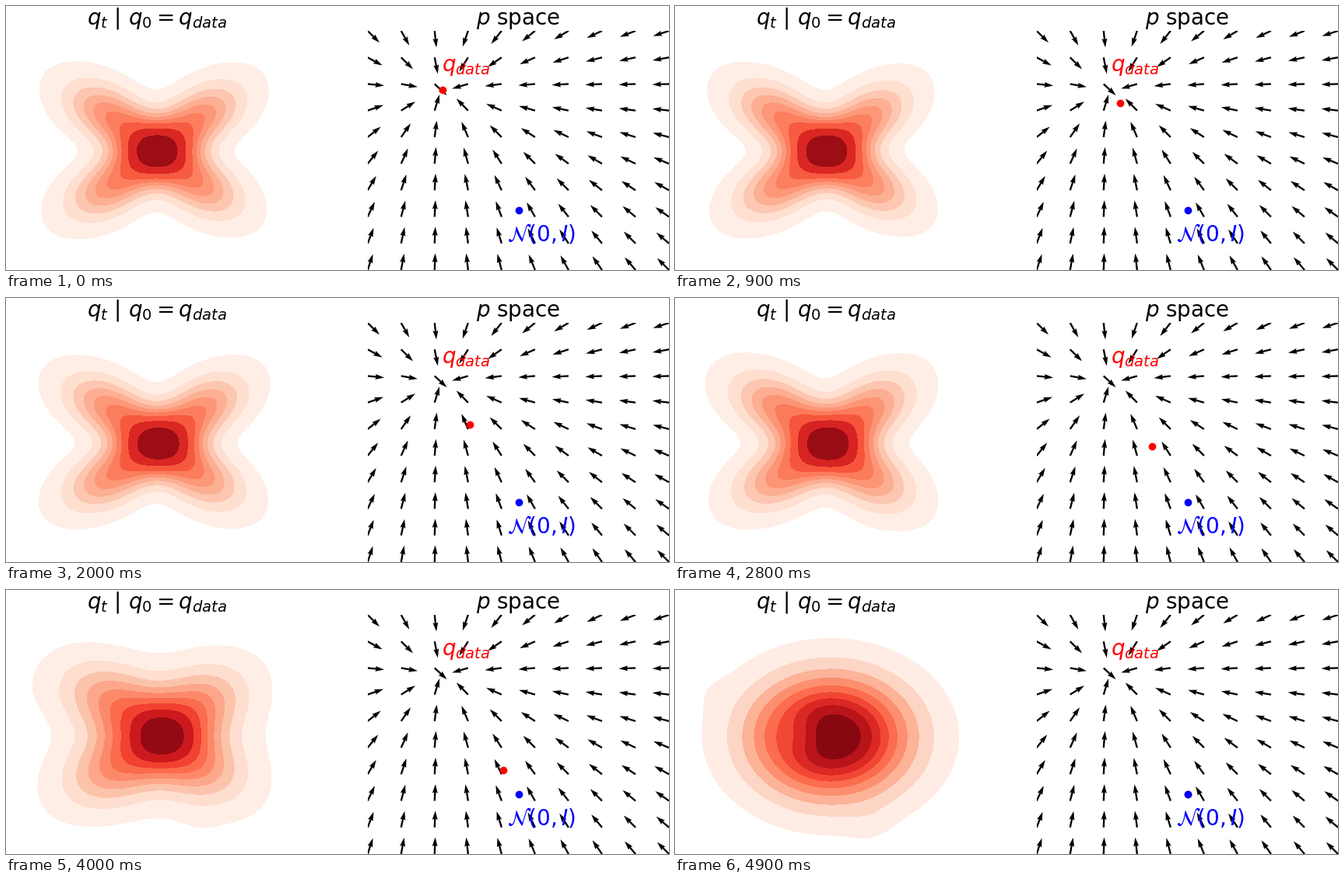
A matplotlib script that plays this animation: 852x340 px, repeating every 5000 ms.

```python
import numpy as np
import matplotlib.pyplot as plt
from matplotlib.animation import FuncAnimation

W, H, DPI = 852, 340, 100
FRAMES, INTERVAL = 50, 100
TOP = 32
PANEL = W / 2.2

# Density: an X of four soft arms that dissolves into a Gaussian
UNIT = np.array([130.0, 100.0])
CENTER = np.array([189, 185])
ARM = np.array([127, 98])
GAUSS_STD = 0.53
BUMPS = [(45, 130, 0.02), (250, 300, 0.03), (163, 188, -0.16)]
BUMP_SIZE = 20

START, STOP = np.array([561, 108]), np.array([659, 263])
HOLD = 4

gx, gy = np.meshgrid(np.linspace(0, PANEL, 170), np.linspace(TOP, H, 140))


def smooth_step(z):
    """Close to the normal distribution function."""
    return 0.5 * (1 + np.tanh(0.8 * z))


def arm_density(u, v, tip, width):
    length = np.hypot(*tip)
    cos, sin = tip / length
    along, across = u * cos + v * sin, u * sin - v * cos
    fade = np.hypot(width, 0.25)
    reach = length - 1.28 * fade
    spread = width * (1 + 0.15 * np.maximum(along, 0))
    return (0.5 * smooth_step((reach - along) / fade) * smooth_step(along / width)
            * np.exp(-0.5 * (across / spread) ** 2))


def density(i):
    t = i / (FRAMES - 1)
    jitter = np.random.default_rng(i).normal(0, 2, (4, 2))
    peak = np.array([195 + 5 * t, 187 + 2 * t])
    width = 0.205 + 0.1 * t ** 4
    u, v = (gx - peak[0]) / UNIT[0], (gy - peak[1]) / UNIT[1]

    corners = [(-1, -1), (1, -1), (1, 1), (-1, 1)]
    tips = (CENTER + ARM * corners + jitter - peak) / UNIT
    cross = sum(arm_density(u, v, tip, width) for tip in tips)
    gauss = np.exp(-(u ** 2 + v ** 2) / (2 * GAUSS_STD ** 2))
    z = cross + (gauss - cross) * t ** 8
    for x, y, strength in BUMPS:
        distance = np.hypot(gx - x, gy - y) / BUMP_SIZE
        z += strength * t ** 4 * np.exp(-0.5 * distance ** 2)
    return np.maximum(z, 0)


def mass_levels(z, count=10, thresh=0.05):
    """Density levels that enclose equal steps of probability mass."""
    ranked = np.sort(z.ravel())[::-1]
    share = np.cumsum(ranked) / ranked.sum()
    index = np.searchsorted(share, 1 - np.linspace(thresh, 1, count))
    return ranked[index]


fig, (left, right) = plt.subplots(1, 2, figsize=(W / DPI, H / DPI), dpi=DPI)
fig.subplots_adjust(left=0, right=1, bottom=0, top=1 - TOP / H, wspace=0.2)
for ax, x0, title in ((left, 0, r"$q_t$ | $q_0 = q_{data}$"),
                      (right, W - PANEL, r"$p$ space")):
    ax.set_xlim(x0, x0 + PANEL)
    ax.set_ylim(H, TOP)
    ax.axis("off")
    ax.set_title(title, fontsize=20)

# Unit vectors pointing at the data distribution
qx, qy = np.meshgrid(np.linspace(W - PANEL, W, 10), np.linspace(TOP, H, 10))
du, dv = (START[0] - qx) / PANEL, (qy - START[1]) / (H - TOP)
norm = np.hypot(du, dv)
right.quiver(qx, qy, du / norm, dv / norm)

red_dot, = right.plot(*START, "o", color="red")
right.plot(*STOP, "o", color="blue")
right.text(560, 84.5, r"$q_{data}$", color="red", fontsize=20)
right.text(644, 302.5, r"$\mathcal{N}(0, I)$", color="blue", fontsize=20)

shown = []


def draw(i):
    while shown:
        shown.pop().remove()
    z = density(i)
    shown.append(left.contourf(gx, gy, z, levels=mass_levels(z), cmap="Reds"))
    progress = max(0, i - HOLD) / (FRAMES - 1 - HOLD)
    x, y = START + (STOP - START) * progress
    red_dot.set_data([x], [y])
    return shown + [red_dot]


anim = FuncAnimation(fig, draw, frames=FRAMES, interval=INTERVAL,
                     init_func=lambda: draw(0), repeat=True, repeat_delay=0)
plt.show()
```
